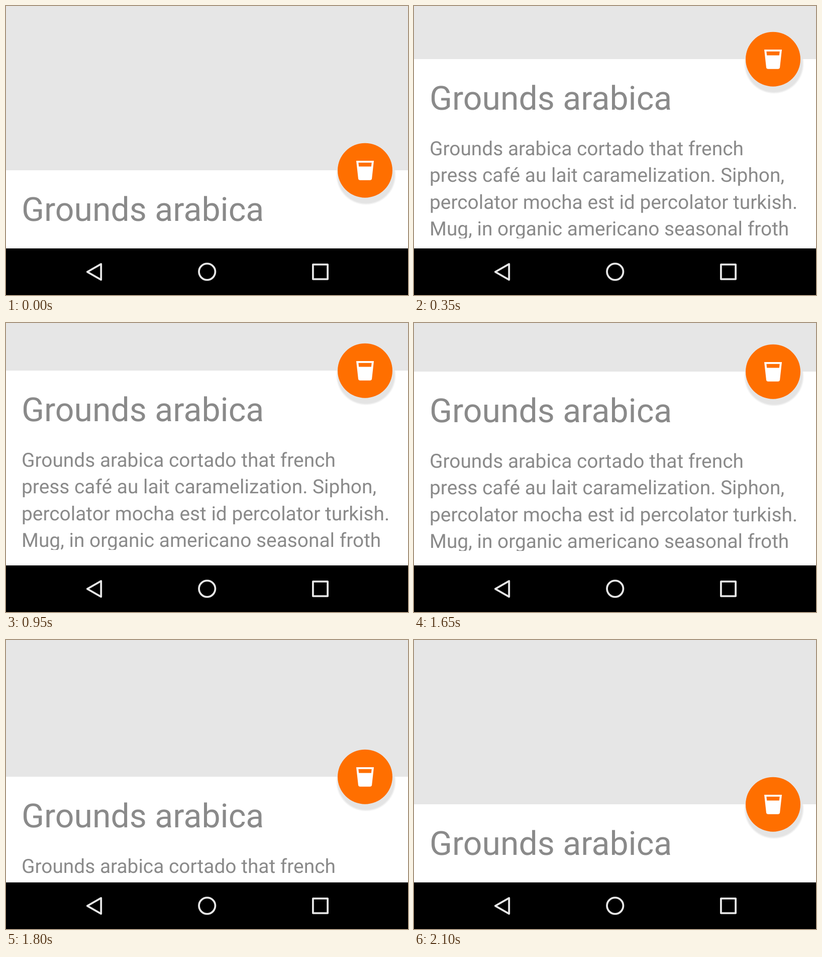
These frames come from a looping animation (800x577 px, 3550 ms). An HTML page:

```html
<!DOCTYPE html>
<html lang="en">
<head>
<meta charset="utf-8">
<title>Bottom sheet</title>
<style>
  html, body { margin: 0; height: 100%; overflow: hidden; background: #e6e6e6; }
  svg { display: block; width: 100%; height: 100%; }
  text { font-family: Roboto, sans-serif; fill: #8a8a8a; text-rendering: geometricPrecision; }
  .title { font-size: 66.15px; }
  .body { font-size: 38.87px; }
  .nav { fill: none; stroke: #e7e7e7; stroke-width: 3.8; stroke-linejoin: round; }
</style>
</head>
<body>
<svg viewBox="0 0 800 577">
  <defs>
    <radialGradient id="shadow">
      <stop offset=".93" stop-color="#e4e4e4"/>
      <stop offset="1" stop-color="#e4e4e4" stop-opacity="0"/>
    </radialGradient>
    <clipPath id="bodyClip"><rect y="150" width="800" height="208"/></clipPath>
  </defs>
  <rect width="800" height="577" fill="#e6e6e6"/>

  <g id="sheet" transform="translate(0 328)">
    <rect width="800" height="577" fill="#fff"/>
    <text class="title" x="31" y="101">Grounds arabica</text>
    <g class="body" clip-path="url(#bodyClip)">
      <text x="31" y="192">Grounds arabica cortado that french</text>
      <text x="31" y="245.4">press café au lait caramelization. Siphon,</text>
      <text x="31" y="298.8">percolator mocha est id percolator turkish.</text>
      <text x="31" y="352.2">Mug, in organic americano seasonal froth</text>
    </g>
    <circle cx="716.5" cy="9.5" r="60" fill="url(#shadow)"/>
    <circle cx="714.5" cy="0.2" r="54.5" fill="#ff6f00"/>
    <path transform="translate(691.2 -23) scale(1.945)" fill="#fff" fill-rule="evenodd"
      d="M3 2l2 18.2Q5.2 22 7 22h10q1.8 0 2-1.8L21 2zM18.33 8H5.67l-.44-4h13.54z"/>
  </g>

  <rect y="484" width="800" height="93"/>
  <g class="nav">
    <path d="M161.8 530.8L189.2 515.2V546.6Z"/>
    <circle cx="400.2" cy="530.6" r="16.2"/>
    <rect x="610.9" y="516.1" width="29.2" height="29.2"/>
  </g>
</svg>
<script>
const LOOP = 3550, STEP = 50, DURATION = 385;
const CLOSED = 328, OPEN = 95, OPEN_AT = 81, CLOSE_AT = 1634;
const sheet = document.getElementById('sheet');

// cubic-bezier(.3, 0, .11, 1)
function ease(x) {
  if (x <= 0) return 0;
  if (x >= 1) return 1;
  let lo = 0, hi = 1;
  for (let i = 0; i < 24; i++) {
    const s = (lo + hi) / 2, r = 1 - s;
    if (.9 * s * r * r + .33 * s * s * r + s ** 3 < x) lo = s; else hi = s;
  }
  return lo * lo * (3 - 2 * lo);
}

function draw(now) {
  const t = Math.floor(now % LOOP / STEP) * STEP;
  const shown = ease((t - OPEN_AT) / DURATION) - ease((t - CLOSE_AT) / DURATION);
  const y = Math.round(CLOSED + (OPEN - CLOSED) * shown);
  sheet.setAttribute('transform', `translate(0 ${y})`);
}

let start;
function tick(now) {
  start ??= now;
  draw(now - start);
  requestAnimationFrame(tick);
}
requestAnimationFrame(tick);
</script>
</body>
</html>
```
